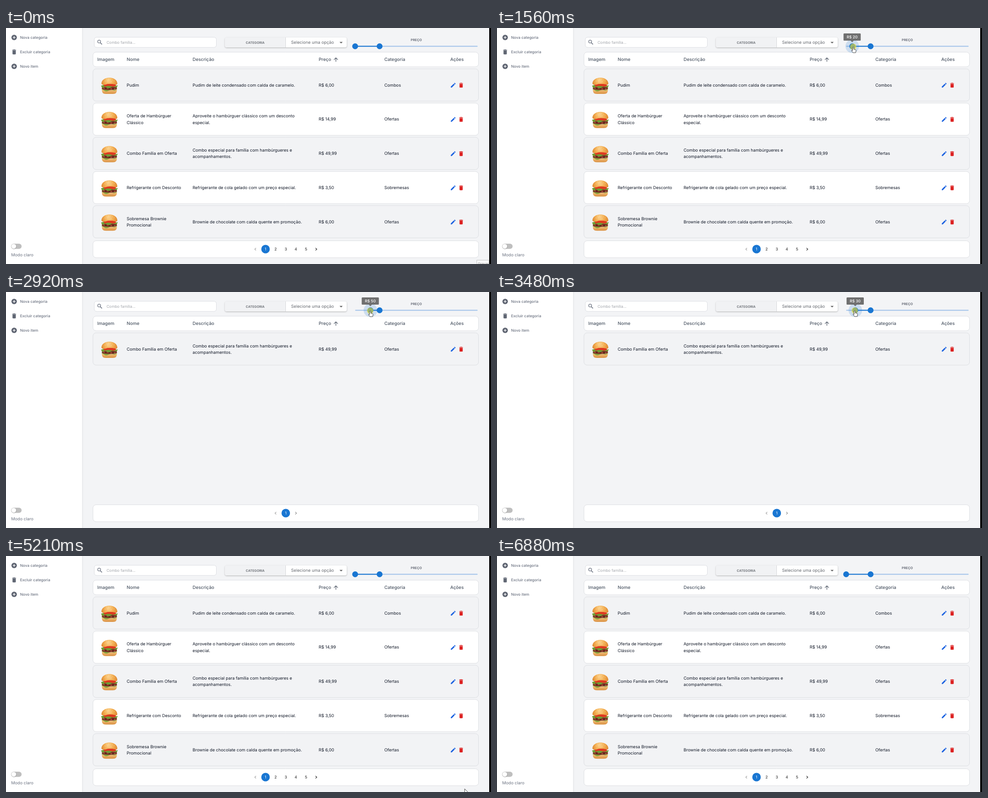
These frames come from a looping animation (1071 px wide and 523 px high, 7.28 s). An HTML page with a canvas:

```html
<!DOCTYPE html>
<html lang="pt">
<head>
<meta charset="utf-8">
<title>Cardápio</title>
<style>
html, body { margin: 0; width: 100%; height: 100%; overflow: hidden; background: #f3f4f6; }
canvas { display: block; width: 1071px; height: 523px; }
</style>
</head>
<body>
<canvas id="stage"></canvas>
<script>
const W = 1071, H = 523, LOOP = 7280;
const canvas = document.getElementById('stage');
const ratio = window.devicePixelRatio || 1;
canvas.width = W * ratio;
canvas.height = H * ratio;
const c = canvas.getContext('2d');
c.textRendering = 'geometricPrecision';

const BLUE = '#1976d2', PAGE = '#f3f4f6', LINE = '#dcdee2', INK = '#111827', GRAY = '#6b7280', ICON = '#5f6572';
const ROW_TOP = 90.5, ROW_STEP = 75.8, ROW_H = 71.5;
const COL = { name: 266.5, text: 412, price: 690.5, cat: 835.5 };
const PENCIL = new Path2D('M3 17.25V21h3.75L17.81 9.94l-3.75-3.75L3 17.25zM20.71 7.04c.39-.39.39-1.02 0-1.41l-2.34-2.34c-.39-.39-1.02-.39-1.41 0l-1.83 1.83 3.75 3.75 1.83-1.83z');
const TRASH = new Path2D('M6 19c0 1.1.9 2 2 2h8c1.1 0 2-.9 2-2V7H6v12zM19 4h-3.5l-1-1h-5l-1 1H5v2h14V4z');
const ARROW = new Path2D('M0 0V11L2.6 8.6L4.3 12.4L6 11.7L4.3 8H7.8Z');
const HAND = new Path2D('M-1.3 1Q0 -.7 1.3 1V5L5.2 5.8Q6.6 6.4 6.3 8.3L5.4 12.8H-.4L-3.5 8.5Q-4 6.9 -2.6 7L-1.3 8.2Z');

const item = (name, text, price, cat) => ({ name, text, price, cat });
const offer = item('Oferta de Hambúrguer|Clássico', 'Aproveite o hambúrguer clássico com um desconto|especial.', '14,99', 'Ofertas');
const combo = item('Combo Família em Oferta', 'Combo especial para família com hambúrgueres e|acompanhamentos.', '49,99', 'Ofertas');
const allItems = {
  pages: 5,
  rows: [
    item('Pudim', 'Pudim de leite condensado com calda de caramelo.', '6,00', 'Combos'),
    offer,
    combo,
    item('Refrigerante com Desconto', 'Refrigerante de cola gelado com um preço especial.', '3,50', 'Sobremesas'),
    item('Sobremesa Brownie|Promocional', 'Brownie de chocolate com calda quente em promoção.', '6,00', 'Ofertas')
  ]
};
const comboOnly = { pages: 1, rows: [combo] };
const overTen = {
  pages: 3,
  rows: [
    offer,
    combo,
    item('Brownie de Chocolate', 'Brownie quente de chocolate servido com sorvete de|creme.', '10,50', 'Sobremesas'),
    item('Hambúrguer Cheddar Bacon', 'Hambúrguer de carne com cheddar derretido e bacon|crocante.', '18,50', 'Hambúrgueres'),
    item('Hambúrguer Clássico', 'Hambúrguer de carne suculenta, queijo, alface, tomate e|maionese.', '15,00', 'Hambúrgueres')
  ]
};

// Pointer path: time, x, y
const path = [
  [70, 1057, 513], [200, 905, 340], [340, 735, 130], [430, 693, 66], [520, 728, 52], [610, 767, 50],
  [810, 767, 50], [950, 770, 42], [1150, 771, 42], [1490, 785, 42], [1560, 786.5, 42],
  [2050, 806, 42], [2850, 806, 42], [3480, 790, 41.5], [3620, 789, 41.5], [4180, 765, 41],
  [4380, 764, 42], [4520, 790, 90], [4800, 900, 320], [5070, 996, 488], [5210, 1013, 516],
  [5300, 1000, 512], [5560, 680, 270], [5840, 350, 60], [5930, 352, 54], [6250, 680, 190],
  [6600, 1037, 428], [6740, 1050, 480], [6870, 1060, 524]
];

function pointer(t) {
  for (let i = 1; i < path.length; i++) {
    const [t0, x0, y0] = path[i - 1], [t1, x1, y1] = path[i];
    if (t >= t0 && t < t1) {
      const k = (t - t0) / (t1 - t0);
      return { x: x0 + (x1 - x0) * k, y: y0 + (y1 - y0) * k };
    }
  }
  return null;
}

const between = (t, a, b) => t >= a && t < b;
const priceX = v => 771 + v * 0.675;

function listAt(t) {
  if (between(t, 1770, 3970)) return comboOnly;
  if (between(t, 3970, 4450)) return overTen;
  return allItems;
}

function label(s, x, y, size, color, weight = 400, align = 'left') {
  c.font = `${weight} ${size}px Inter, "Noto Sans", sans-serif`;
  c.fillStyle = color;
  c.textAlign = align;
  c.fillText(s, x, y);
}

function lines(s, x, mid) {
  const parts = s.split('|');
  parts.forEach((p, i) => label(p, x, mid + 3.3 + (i - (parts.length - 1) / 2) * 14.2, 9.27, INK));
}

function box(x, y, w, h, r, fill, stroke) {
  c.beginPath();
  c.roundRect(x, y, w, h, r);
  c.fillStyle = fill;
  c.fill();
  if (stroke) {
    c.strokeStyle = stroke;
    c.lineWidth = 1;
    c.stroke();
  }
}

function disc(x, y, r, fill) {
  c.beginPath();
  c.arc(x, y, r, 0, Math.PI * 2);
  c.fillStyle = fill;
  c.fill();
}

function poly(points, color, width) {
  c.beginPath();
  points.forEach(([x, y]) => c.lineTo(x, y));
  c.strokeStyle = color;
  c.lineWidth = width;
  c.stroke();
}

function icon(shape, x, y, size, color) {
  c.save();
  c.translate(x - size / 2, y - size / 2);
  c.scale(size / 24, size / 24);
  c.fillStyle = color;
  c.fill(shape);
  c.restore();
}

function shadow(blur, y, alpha) {
  c.shadowColor = `rgba(0,0,0,${alpha})`;
  c.shadowBlur = blur;
  c.shadowOffsetY = y;
}

function plus(x, y) {
  disc(x, y, 6, ICON);
  poly([[x - 3, y], [x + 3, y]], '#fff', 1.3);
  poly([[x, y - 3], [x, y + 3]], '#fff', 1.3);
}

function blob(d, fill) {
  c.fillStyle = fill;
  c.fill(new Path2D(d));
}

function burger(x, y) {
  c.save();
  c.translate(x, y);
  const bun = c.createRadialGradient(-2, -13, 1, 0, -8, 19);
  bun.addColorStop(0, '#fbd08a');
  bun.addColorStop(0.5, '#f3ad50');
  bun.addColorStop(1, '#d9812f');
  const base = c.createLinearGradient(0, 9, 0, 18);
  base.addColorStop(0, '#f3c27c');
  base.addColorStop(1, '#d98f40');
  blob('M-16.5 8Q0 12 16.5 8Q17.5 18 8 18H-8Q-17.5 18 -16.5 8Z', base);
  // lettuce, patty, lettuce, tomato
  blob('M-18 8Q-9 5 0 8T18 7Q13 12 8 10T-2 11T-11 11T-18 8Z', '#86a840');
  blob('M-16 3Q0 0 16 3Q18 6 15 8Q0 11 -15 8Q-18 6 -16 3Z', '#7a3424');
  for (let i = -3; i <= 3; i++) disc(i * 4, 6 + (i % 2), 1.3, i % 2 ? '#b0593f' : '#4a1d16');
  blob('M-18.5 0Q-9 -4 0 -1T18.5 -1Q17 5 12 3T3 4T-6 4T-13 4T-18.5 0Z', '#6f9d33');
  blob('M-14 -3Q-2 -6 13 -4L15 0Q10 3 3 1T-10 2Z', '#de3a20');
  blob('M-17.5 -4C-18 -13 -9 -18 0 -18C9 -18 18 -13 17.5 -4Q16 -1 12 -3Q4 -5 -4 -4Q-14 0 -17.5 -4Z', bun);
  c.globalAlpha = 0.6;
  for (let i = 0; i < 13; i++) disc(Math.sin(i * 2.4) * (3 + i * 0.75), -12 + Math.cos(i * 2.4) * 4, 0.6, '#fff0cc');
  c.restore();
}

function sidebar() {
  c.save();
  shadow(4, 0, 0.12);
  c.fillStyle = '#fff';
  c.fillRect(0, -5, 168, H + 10);
  c.restore();
  plus(18, 21);
  icon(TRASH, 18, 53, 14.5, ICON);
  plus(18, 85);
  label('Nova categoria', 31, 24, 8.35, GRAY, 500);
  label('Excluir categoria', 31, 56, 8.35, GRAY, 500);
  label('Novo item', 31, 88, 8.35, GRAY, 500);
  box(11.5, 478, 23, 11.5, 5.75, '#bfbfbf');
  c.save();
  shadow(1.5, 0.5, 0.4);
  disc(17.2, 483.7, 5.2, '#fff');
  c.restore();
  label('Modo claro', 11.5, 506, 9.2, GRAY);
}

function filters() {
  box(195, 20.5, 269.5, 22.5, 5, '#fff', LINE);
  c.beginPath();
  c.arc(205.7, 30, 3.2, 0, Math.PI * 2);
  c.strokeStyle = GRAY;
  c.lineWidth = 1.3;
  c.stroke();
  poly([[208, 32.4], [212, 36.4]], GRAY, 1.5);
  label('Combo família...', 222, 34.6, 8.4, '#a3a6ac');

  c.save();
  shadow(3, 1, 0.28);
  box(483.5, 21, 269, 22, 4, '#fff');
  c.restore();
  box(483.5, 21, 134, 22, [4, 0, 0, 4], '#f1f2f4');
  poly([[617.5, 21], [617.5, 43]], '#d5d7da', 1);
  label('CATEGORIA', 550.3, 34.6, 7.15, '#666a70', 600, 'center');
  label('Selecione uma opção', 629.5, 35.3, 9.3, '#666a70');
  blob('M736.5 30.7H743.5L740 34.2Z', '#666');
  label('PREÇO', 906, 28.5, 7.2, '#5f6470', 600, 'center');
}

function slider(value, active) {
  const x = priceX(value), end = priceX(80);
  box(771, 39.5, 270.5, 2, 1, '#9fc2ea');
  box(x, 39.5, end - x, 2, 1, BLUE);
  if (active) disc(x, 40.5, 15, 'rgba(25,118,210,.18)');
  disc(x, 40.5, 6.5, BLUE);
  disc(end, 40.5, 6.5, BLUE);
}

function tip(value) {
  const x = priceX(value), s = 'R$ ' + value;
  c.font = '500 8.5px Inter, "Noto Sans", sans-serif';
  const w = c.measureText(s).width + 14;
  box(x - w / 2 - 0.3, 12, w, 16, 1.5, '#707070');
  blob(`M${x - 3.7} 28H${x + 3.3}L${x - 0.2} 31.5Z`, '#707070');
  label(s, x - 0.3, 23.2, 8.5, '#fff', 500, 'center');
}

function header() {
  box(192, 53.5, 851.5, 32.5, 7, '#fff', LINE);
  const heads = [['Imagem', 201.5], ['Nome', COL.name], ['Descrição', COL.text], ['Preço', COL.price], ['Categoria', COL.cat], ['Ações', 981]];
  heads.forEach(([s, x]) => label(s, x, 73.3, 9.9, '#4b5563', 500));
  poly([[728.5, 74.7], [728.5, 66]], '#4b5563', 1.2);
  poly([[724.2, 70.3], [728.5, 66], [732.8, 70.3]], '#4b5563', 1.2);
}

function row(it, i) {
  const y = ROW_TOP + i * ROW_STEP, mid = y + 35.8;
  box(192, y, 851.5, ROW_H, 7, i % 2 ? '#fff' : '#f2f3f5', LINE);
  burger(228.3, mid + 1.7);
  lines(it.name, COL.name, mid);
  lines(it.text, COL.text, mid);
  lines('R$ ' + it.price, COL.price, mid);
  lines(it.cat, COL.cat, mid);
  icon(PENCIL, 987.5, mid + 0.5, 14, '#1d63e0');
  icon(TRASH, 1005, mid + 0.5, 14, '#dc2020');
}

function chevron(x, dir, color) {
  poly([[x - 1.3 * dir, 487.5], [x + 1.4 * dir, 490.2], [x - 1.3 * dir, 492.9]], color, 1.2);
}

function pager(pages) {
  box(192, 471.5, 851.5, 37.5, 7, '#fff', LINE);
  const step = 22.35, left = 617.8 - (pages + 1) / 2 * step;
  chevron(left, -1, '#a0a0a0');
  disc(left + step, 490, 9.4, BLUE);
  for (let n = 1; n <= pages; n++) {
    label(String(n), left + n * step, 493.2, 8.6, n === 1 ? '#fff' : '#222', 400, 'center');
  }
  chevron(left + (pages + 1) * step, 1, pages > 1 ? '#222' : '#8a8a8a');
}

function drawPointer(p, hand, pressed) {
  if (pressed) disc(p.x, p.y - 0.5, 7, 'rgba(240,222,40,.6)');
  const shape = hand ? HAND : ARROW;
  c.save();
  c.translate(p.x, p.y);
  c.fillStyle = '#fff';
  c.fill(shape);
  c.strokeStyle = '#1a1a1a';
  c.lineWidth = 0.8;
  c.stroke(shape);
  c.restore();
}

function draw(t) {
  const p = pointer(t);
  const hover = between(t, 880, 4450);
  const pressed = between(t, 1150, 4380);
  const value = pressed ? Math.max(0, Math.round((p.x - 771) / 6.75) * 10) : 0;
  const list = listAt(t);

  c.setTransform(ratio, 0, 0, ratio, 0, 0);
  c.fillStyle = PAGE;
  c.fillRect(0, 0, W, H);
  sidebar();
  filters();
  header();
  list.rows.forEach(row);
  pager(list.pages);
  slider(value, hover);
  if (hover) tip(value);
  if (t < 70) {
    box(1039.5, 514.5, 27, 12, 0, '#f9f9f9', '#c4c4c4');
    label('Gravar', 1042, 525, 7.6, '#8a8a8a');
  }
  if (p) drawPointer(p, hover, pressed);
  c.fillStyle = '#000';
  c.fillRect(1067, 0, 4, H);
}

const start = performance.now();
function tick() {
  draw((performance.now() - start) % LOOP);
  requestAnimationFrame(tick);
}
tick();
</script>
</body>
</html>
```
